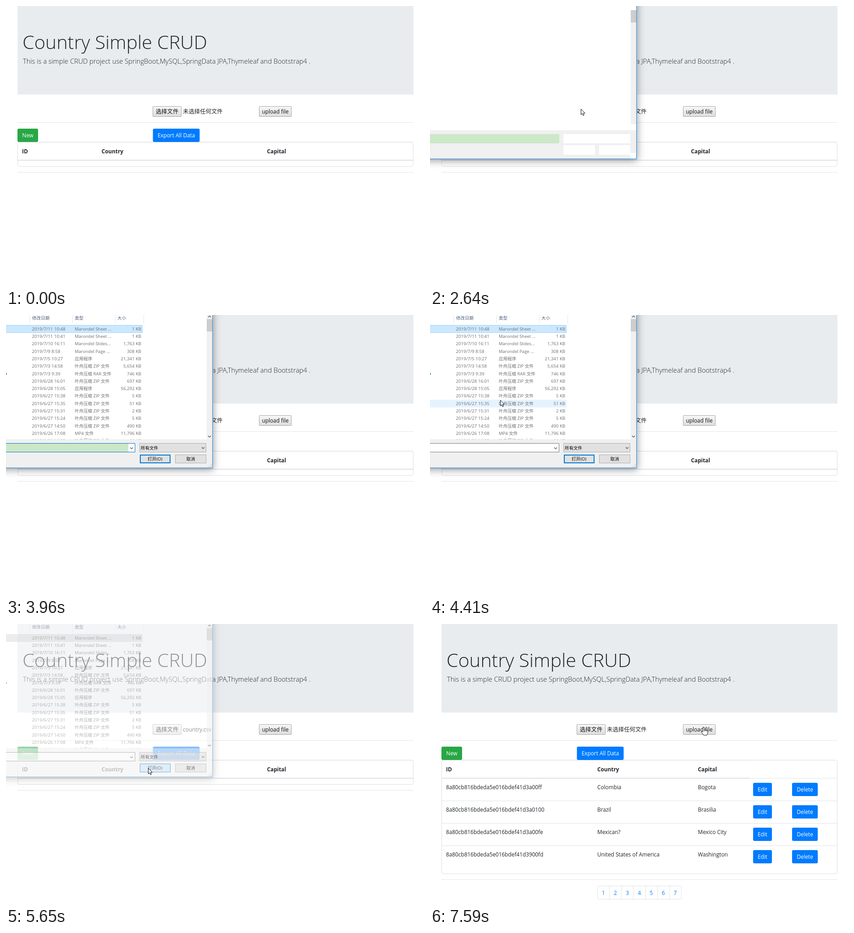
An HTML page with a canvas for the animation above (8 s loop, 912 by 614 pixels).

```html
<!DOCTYPE html>
<html lang="zh-CN">
<head>
<meta charset="utf-8">
<title>Country Simple CRUD</title>
<style>
  html, body { margin: 0; width: 100%; height: 100%; overflow: hidden; background: #fff; }
  canvas { display: block; }
</style>
</head>
<body>
<canvas id="stage" width="912" height="614"></canvas>
<script>
const g = document.getElementById('stage').getContext('2d');
const LOOP = 8000, TICK = 77.2, ROW = 16.32;
const FAMILY = "'Open Sans', 'Noto Sans CJK SC', sans-serif";
const INK = '#212529', BLUE = '#007bff', ACCENT = '#0078d7';

const arrow = new Path2D('M.5 0V12.6L3.3 10L5.2 14.4L7.2 13.5L5.4 9.3H9.2Z');
const hand = new Path2D('M-1.5 10V1.2Q0-1 1.5 1.2V6.5Q3.3 5 4.3 7Q6 5.8 7 7.6Q9 7 9 9V13Q8.5 15 7 18H0L-4 12Q-5 9.5-3.2 9.5Z');

// time, x, y of the pointer
const path = [
  [300, 829, 604], [1080, 372, 264], [1310, 355, 230], [2300, 355, 230],
  [3080, 285, 216], [3410, -14, 62], [3560, -14, 46], [3640, -14, 30],
  [4010, -14, 30], [4710, 271, 296], [5240, 313, 315], [5560, 313, 315],
  [5800, 302, 314], [5980, 302, 314], [6480, 592, 234], [6560, 592, 234], [6730, 597, 225]
];

const zip = '叶舟压缩 ZIP 文件';
const files = [
  ['2019/7/11 10:48', 'Marondel Sheet ...', '1'],
  ['2019/7/11 10:41', 'Marondel Sheet ...', '1'],
  ['2019/7/10 16:11', 'Marondel Slides...', '1,763'],
  ['2019/7/9 8:58', 'Marondel Page ...', '308'],
  ['2019/7/5 10:27', '应用程序', '21,341'],
  ['2019/7/3 14:58', zip, '5,654'],
  ['2019/7/3 9:39', '叶舟压缩 RAR 文件', '746'],
  ['2019/6/28 16:01', zip, '697'],
  ['2019/6/28 15:05', '应用程序', '56,292'],
  ['2019/6/27 15:38', zip, '5'],
  ['2019/6/27 15:35', zip, '51'],
  ['2019/6/27 15:31', zip, '2'],
  ['2019/6/27 15:24', zip, '5'],
  ['2019/6/27 14:50', zip, '490'],
  ['2019/6/26 17:08', 'MP4 文件', '11,796'],
  ['2019/6/26 16:52', zip, '84']
];

const countries = [
  ['3a00ff', 'Colombia', 'Bogota'],
  ['3a0100', 'Brazil', 'Brasilia'],
  ['3a00fe', 'Mexican?', 'Mexico City'],
  ['3900fd', 'United States of America', 'Washington']
];

function text(s, x, y, size = 11.8, color = INK, weight = 400, align = 'left') {
  g.font = `${weight} ${size}px ${FAMILY}`;
  g.fillStyle = color;
  g.textAlign = align;
  g.fillText(s, x, y);
}

function rect(x, y, w, h, color) {
  g.fillStyle = color;
  g.fillRect(x, y, w, h);
}

function frame(x, y, w, h, color, radius = 0, line = 1) {
  g.strokeStyle = color;
  g.lineWidth = line;
  g.beginPath();
  g.roundRect(x + line / 2, y + line / 2, w - line, h - line, radius);
  g.stroke();
}

function chevron(x, y, dir = 1, color = '#444') {
  g.strokeStyle = color;
  g.lineWidth = 1.1;
  g.beginPath();
  g.moveTo(x - 3, y - 1.5 * dir);
  g.lineTo(x, y + 1.5 * dir);
  g.lineTo(x + 3, y - 1.5 * dir);
  g.stroke();
}

function button(label, x, y, w, color) {
  g.fillStyle = color;
  g.beginPath();
  g.roundRect(x, y, w, 29, 3);
  g.fill();
  text(label, x + w / 2, y + 19, 11.8, '#fff', 400, 'center');
}

function formButton(label, x, w, size, hover, pressed) {
  const fill = g.createLinearGradient(0, 219, 0, 242);
  fill.addColorStop(0, pressed ? '#dddddd' : '#f8f8f8');
  fill.addColorStop(1, pressed ? '#f4f4f4' : '#dddddd');
  rect(x, 219, w, 23, fill);
  frame(x, 219, w, 23, hover ? '#6b6b6b' : '#a6a6a6', 1);
  text(label, x + w / 2, 235, size, '#111', 400, 'center');
}

const rule = y => rect(25, y, 864, 1, '#e4e4e4');
const inside = (p, x, y, w, h) => p && p.x >= x && p.x < x + w && p.y >= y && p.y < y + h;

function pointerAt(t) {
  if (t < path[0][0]) return null;
  const i = path.findIndex(k => k[0] > t);
  if (i < 0) return { x: path.at(-1)[1], y: path.at(-1)[2] };
  const [t0, x0, y0] = path[i - 1], [t1, x1, y1] = path[i];
  const u = (t - t0) / (t1 - t0), e = u * u * (3 - 2 * u);
  return { x: Math.round(x0 + (x1 - x0) * e), y: Math.round(y0 + (y1 - y0) * e) };
}

function drawTable(loaded) {
  const bottom = loaded ? 546 : 351;
  const cols = loaded ? [35, 365, 584.5] : [35, 208.5, 569.5];
  frame(25, 297, 864, bottom - 297, '#dfdfdf', 3);
  const headEnd = loaded ? 696 : 888;
  rect(26, 297, headEnd - 26, 1, '#d3d6d9');
  rect(26, 336.5, 862, 1, '#dee2e6');
  rect(26, 336, headEnd - 26, 1.5, '#dbdee2');
  ['ID', 'Country', 'Capital'].forEach((s, i) => text(s, cols[i], 322, 11.8, INK, 700));
  rule(loaded ? 558 : 363);
  if (!loaded) return;

  countries.forEach(([id, country, capital], i) => {
    const y = 361 + 49 * i;
    if (i) rect(26, y - 24, 862, 1, '#dee2e6');
    text('8a80cb816bdeda5e016bdef41d' + id, cols[0], y);
    text(country, cols[1], y);
    text(capital, cols[2], y);
    button('Edit', 705, y - 14, 41, BLUE);
    button('Delete', 790, y - 14, 56, BLUE);
  });
  frame(365, 572, 184, 30, '#dee2e6', 3);
  for (let i = 0; i < 7; i++) {
    const x = 365 + 26.15 * i;
    if (i) rect(Math.round(x), 573, 1, 28, '#dee2e6');
    text(i + 1, x + 13.3, 591.5, 11.8, BLUE, 400, 'center');
  }
}

function drawPage(t, p) {
  rect(0, 0, 912, 614, '#fff');
  rect(25, 0, 864, 193.5, '#e9ecef');
  text('Country Simple CRUD', 36, 94, 41.3, INK, 300);
  text('This is a simple CRUD project use SpringBoot,MySQL,SpringData JPA,Thymeleaf and Bootstrap4 .',
    37, 126, 14.65, INK, 300);

  const loaded = t >= 7590, chosen = t >= 5560 && !loaded;
  formButton('选择文件', 320, 63, 12.4, inside(p, 320, 219, 63, 23));
  text(chosen ? 'country.csv' : '未选择任何文件', 386, 235, chosen ? 11.8 : 12.4);
  formButton('upload file', 552, 71, 11.8, !loaded && inside(p, 552, 219, 71, 23), t >= 7030 && t < 7200);
  rule(254);
  button('New', 25, 268, 45, '#28a745');
  button('Export All Data', 320.5, 268, 102, inside(p, 321, 268, 102, 29) ? '#0069d9' : BLUE);
  drawTable(loaded);
}

function highlight(i, fill, edge) {
  const y = Math.round(22 + ROW * i);
  rect(-2, y, 300, 17, fill);
  if (edge) frame(-2, y, 300, 17, edge);
}

function drawList(t, p) {
  const dim = '#6d6d6d';
  [51, 145, 238, 300].forEach(x => rect(x, 0, 1, 18, '#e5e5e5'));
  text('修改日期', 57, 10, 9.5, '#4c607a');
  text('类型', 150, 10, 9.5, '#4c607a');
  text('大小', 243, 10, 9.5, '#4c607a');

  g.save();
  g.beginPath();
  g.rect(0, 0, 438, 271.5);
  g.clip();
  if (inside(p, -50, 22, 348, 249)) highlight(Math.floor((p.y - 22) / ROW), '#e5f3ff');
  if (t >= 5410) highlight(0, '#d9d9d9');
  else if (t >= 3960) highlight(0, '#cce8ff', '#99d1ff');
  files.forEach(([date, type, size], i) => {
    const y = 33.6 + ROW * i;
    text(date, 56.5, y, 9.7, dim);
    text(type, 150, y, 9.5, dim);
    text(size + ' KB', 295, y, 9.6, dim, 400, 'right');
  });
  rect(0, 127, 2, 3, '#21a366');
  g.restore();
}

function drawControls(t, p) {
  const picked = t >= 4040;
  rect(-2, 280, 284, 20, '#fff');
  if (!picked) rect(0, 281, 267, 18, '#cce8c8');
  if (inside(p, 267, 280, 15, 20)) rect(267, 281, 14, 18, '#e5f1fb');
  frame(-2, 280, 284, 20, picked ? '#7a7a7a' : ACCENT);
  chevron(274, 291);

  rect(291, 280, 146, 20, '#e1e1e1');
  frame(291, 280, 146, 20, '#adadad');
  text('所有文件', 294, 293.5, 9.5, '#000');
  chevron(430, 290.5);

  const hover = inside(p, 292, 305, 67, 19);
  rect(292, 305, 67, 19, t >= 5410 ? '#cce4f7' : hover ? '#e5f1fb' : '#e1e1e1');
  frame(292, 305, 67, 19, ACCENT, 0, hover ? 1 : 2);
  text('打开(O)', 325, 317.7, 9.5, '#000', 400, 'center');
  rect(369, 305, 68, 19, '#e1e1e1');
  frame(369, 305, 68, 19, '#adadad');
  text('取消', 403, 317.7, 9.5, '#000', 400, 'center');

  for (let i = 0; i < 3; i++)
    for (let j = 0; j <= i; j++) rect(447 - 2.5 * j, 326 + 2.5 * i, 1.3, 1.3, '#b5b5b5');
}

// The shadow is kept outside the window so that it never shows through while fading.
function drawShadow() {
  g.save();
  g.beginPath();
  g.rect(0, 0, 912, 614);
  g.rect(0, 0, 451.5, 335);
  g.clip('evenodd');
  g.shadowColor = 'rgba(0,0,0,.4)';
  g.shadowBlur = 16;
  g.shadowOffsetY = 3;
  rect(-40, -40, 491.5, 375, '#fff');
  g.restore();
}

function drawDialog(t, p) {
  const fade = t < 5560 ? Math.min(1, (t - 2000) / 310) : Math.max(0, 1 - (t - 5500) / 300);
  if (fade <= 0) return;
  g.save();
  g.globalAlpha = fade;
  drawShadow();
  rect(0, 0, 451.5, 335, '#fff');

  if (t >= 2380) {
    const ready = t >= 3180;
    rect(0, 271.5, 450, 62.5, '#f0f0f0');
    rect(438, ready ? 0 : 9, 12, ready ? 271 : 249, '#f0f0f0');
    rect(438, 9, 12, 27, '#cdcdcd');
    if (ready) {
      chevron(444, 3.5, -1);
      chevron(444, 265.5);
      drawList(t, p);
      drawControls(t, p);
    } else {
      rect(0, 280, 282, 20, '#cce8c8');
      rect(291, 280, 146, 20, '#fff');
      rect(291, 304, 69, 21, '#fff');
      rect(369, 304, 68, 21, '#fff');
      rect(437, 321, 13, 13, '#fff');
    }
  }
  frame(-40, -40, 491.5, 375, '#4592d3', 0, 1.5);
  g.restore();
}

function drawPointer(t, p, isHand) {
  const click = [[1460, 1540], [5410, 5560], [7030, 7200]].some(([a, b]) => t >= a && t < b);
  if (click) {
    const glow = g.createRadialGradient(p.x, p.y, 0, p.x, p.y, 10);
    glow.addColorStop(0, 'rgba(255,240,0,.8)');
    glow.addColorStop(.6, 'rgba(255,240,0,.6)');
    glow.addColorStop(1, 'rgba(255,240,0,.15)');
    g.fillStyle = glow;
    g.beginPath();
    g.arc(p.x, p.y, 10, 0, 7);
    g.fill();
  }
  if (t >= 1620 && t < 1930) {
    g.strokeStyle = '#3b9be0';
    g.lineWidth = 2.4;
    g.beginPath();
    g.arc(p.x + 11, p.y, 4.6, 0, 7);
    g.stroke();
  }
  g.save();
  g.translate(p.x, p.y);
  g.fillStyle = '#fff';
  g.strokeStyle = '#111';
  g.lineWidth = 1;
  g.lineJoin = 'round';
  const shape = isHand ? hand : arrow;
  g.fill(shape);
  g.stroke(shape);
  if (isHand) {
    g.beginPath();
    for (const x of [1.5, 4.3, 7]) {
      g.moveTo(x, 6.5);
      g.lineTo(x, 9.5);
    }
    g.stroke();
  }
  g.restore();
}

function draw(now) {
  const t = now % LOOP;
  const p = pointerAt(Math.floor((t + 10) / TICK) * TICK);
  const open = t >= 2080 && t < 5800;
  drawPage(t, open ? null : p);
  if (open) drawDialog(t, p);
  if (p) {
    const overLink = inside(p, 321, 268, 102, 29) || inside(p, 552, 219, 71, 23);
    drawPointer(t, p, !open && overLink);
  }
}

let start;
function loop(now) {
  start ??= now;
  draw(now - start);
  requestAnimationFrame(loop);
}
requestAnimationFrame(loop);
</script>
</body>
</html>
```
